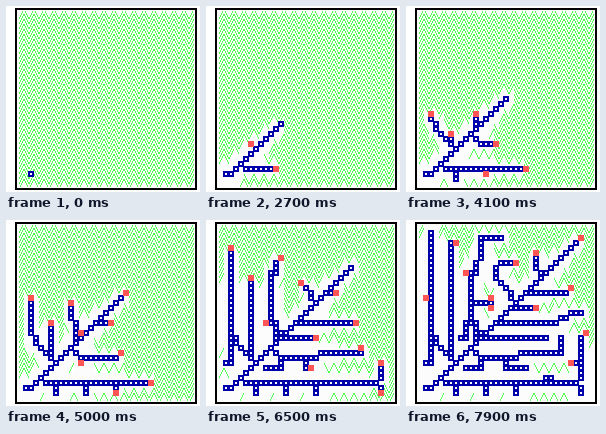
Recreate the animation shown at these times as a matplotlib script. Size 194 px wide and 186 px high, loop 8000 ms.

```python
import numpy as np
import matplotlib.pyplot as plt
from matplotlib.animation import FuncAnimation

W, H, FRAMES = 194, 186, 80
CELL, N = 5, 35
BLUE, RED, GREEN = (0, 0, 170), (255, 85, 85), (85, 255, 85)
PACE, DIAGONAL = 1.55, 2.63  # ticks per straight and per diagonal step
HEADING = {"N": (0, -1), "S": (0, 1), "E": (1, 0), "W": (-1, 0)}


def grow(t, start, moves="", pace=PACE, glow=2):
    """Walk the grid like a turtle; a cell is (column, row, birth, red time)."""
    x, y = start
    cells = [(x, y, t, glow)]
    for move in moves.split():
        heading = move.rstrip("0123456789")
        dx, dy = (sum(HEADING[c][k] for c in heading) for k in (0, 1))
        slow = len(heading) == 2
        for _ in range(int(move[len(heading):])):
            x, y, t = x + dx, y + dy, t + (DIAGONAL if slow else pace)
            cells.append((x, y, t, 1 if slow else glow))
    return cells


def bud(t, start):
    return grow(t, start, glow=FRAMES)


branches = [
    grow(-2, (3, 33), glow=0),
    grow(11, (2, 33), glow=0),
    # trunk and floor
    grow(2.1, (4, 32), "NE29"),
    grow(16.2, (6, 32), "E26 NE1 N8"),
    grow(63, (33, 33), "S1"),
    grow(70.5, (26, 31), "E1"),
    grow(77, (32, 28), "W1"),
    # left columns
    grow(26.5, (7, 27), "NW3 N1 NW1 N20"),
    grow(39.2, (7, 26), "N22 E1", pace=1.72),
    grow(51, (3, 23), "S5 W1"),
    grow(38, (12, 23), "N3 NW1 N9 E1 N2 NE1 N4 E4", pace=1.4),
    # rows to the right
    grow(33.5, (12, 26), "SE1 E7 NE1 E8 N3"),
    grow(49, (13, 28), "S1 W3"),
    grow(56, (18, 28), "S1 E4", pace=4),
    grow(50, (13, 22), "SE1 E12", pace=2),
    grow(46.5, (17, 20), "E11 NE1 E1 NE1 E2"),
    grow(62, (11, 20), "W1 S3 W1", pace=2),
    grow(65.5, (12, 16), "E3", pace=3),
    # crown
    grow(57.4, (19, 15), "N1 NW3 N2 NE1 E3"),
    grow(70.8, (20, 17), "E4", pace=2),
    grow(62, (23, 14), "E7 NE1", pace=2),
    grow(71, (25, 10), "NW1 N3"),
    bud(71, (2, 15)), bud(78, (10, 10)), bud(77, (34, 22)),
    bud(77, (15, 15)), bud(77, (15, 17)),
]
# short roots under the floor, evenly spaced
branches += [grow(33.5 + 7 * k, (8 + 6 * k, 33), "S1") for k in range(3)]

yy, xx = np.mgrid[0:H, 0:W]
inside = (xx >= 11) & (xx <= 188) & (yy >= 4) & (yy <= 181)
border = (xx >= 9) & (xx <= 190) & (yy >= 2) & (yy <= 183) & ~inside
col = np.clip((xx - 8) // CELL, 1, N)
row = np.clip((yy - 1) // CELL, 1, N)
field = (xx >= 13) & (xx <= 187) & (yy >= 5) & (yy <= 180)
# steep zigzag: two pixels of rise per column, turning at every cell
ramp = (xx - 13) % CELL
ramp = 2 * np.where(col % 2, CELL - 1 - ramp, ramp) - CELL


def grazed(n):
    """Cells already used up; the bare patch widens with age."""
    gone = np.zeros((N + 2, N + 2), bool)
    for x, y, t, _ in (c for b in branches for c in b):
        if n > t + 2:
            gone[max(y - 1, 0):y + 2, max(x - 1, 0):x + 2] = True
        if n >= t + 12:
            gone[max(y - 2, 0):y + 3, max(x - 1, 0):x + 2] = True
            gone[max(y - 1, 0):y + 2, max(x - 2, 0):x + 3] = True
    return gone


def node(img, x, y, color):
    px, py = 10 + CELL * x, 3 + CELL * y
    img[py - 3:py + 3, px - 3:px + 3] = color
    if color == BLUE:
        img[py - 1:py + 1, px - 1:px + 1] = 255


def render(n):
    img = np.full((H, W, 3), 255, np.uint8)
    gone = grazed(n)
    img[inside & gone[row, col]] = 252
    for shift in (-1, 0, 1):
        r = row + shift
        rise = yy - (3 + CELL * r) - ramp
        alive = (r >= 1) & (r <= N) & ~gone[r, col]
        img[field & alive & (rise >= 0) & (rise <= 1)] = GREEN
    img[border] = 0

    tips = []
    for cells in branches:
        born = [c for c in cells if c[2] <= n + 1e-6]
        for x, y, _, _ in born:
            node(img, x, y, BLUE)
        if born:
            x, y, t, glow = born[-1]
            if n - t < glow:
                tips.append((x, y))
    for x, y in tips:
        node(img, x, y, RED)
    return img


fig = plt.figure(figsize=(W / 100, H / 100), dpi=100)
ax = fig.add_axes([0, 0, 1, 1])
ax.axis("off")
picture = ax.imshow(render(0), interpolation="nearest", aspect="auto")


def update(n):
    picture.set_data(render(n))
    return [picture]


anim = FuncAnimation(fig, update, frames=FRAMES, interval=100,
                     repeat=True, repeat_delay=0)
plt.show()
```
